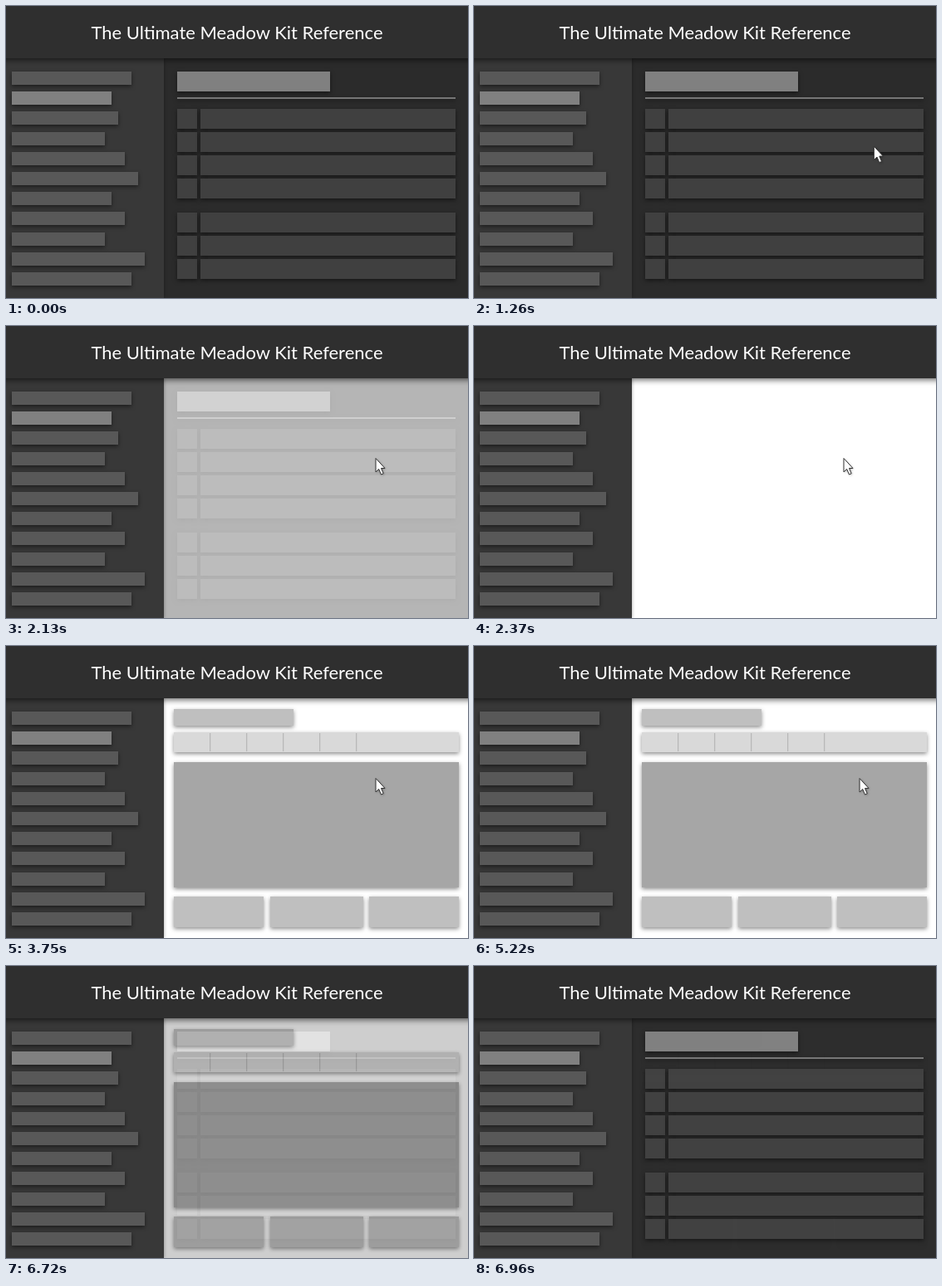
An HTML page with a canvas for the animation above (6.99 s loop, 556 px wide and 352 px high).

```html
<!DOCTYPE html>
<html lang="en">
<head>
<meta charset="utf-8">
<title>Page transition</title>
<style>
  html, body { margin: 0; width: 100%; height: 100%; overflow: hidden; background: #2b2b2b; }
  canvas { position: absolute; left: 0; top: 0; display: block; }
  h1 {
    position: absolute; left: 0; top: 18px; width: 556px; margin: 0;
    font: 400 22px/28px Lato, "Open Sans", sans-serif;
    color: #fff; text-align: center; white-space: nowrap;
  }
</style>
</head>
<body>
<canvas id="stage" width="556" height="352"></canvas>
<h1>The Ultimate Meadow Kit Reference</h1>
<script>
const W = 556, H = 352, LOOP = 6990;
const SIDE = 190, TOP = 63;
const ctx = document.getElementById('stage').getContext('2d');

const grey = v => `rgb(${v},${v},${v})`;
const progress = (t, start, length) => Math.min(1, Math.max(0, (t - start) / length));
const sine = u => (1 - Math.cos(Math.PI * u)) / 2;
const cubic = u => u < 0.5 ? 4 * u ** 3 : 1 - 4 * (1 - u) ** 3;

function layer(paint) {
  const c = document.createElement('canvas');
  c.width = W;
  c.height = H;
  paint(c.getContext('2d'));
  return c;
}

function setShadow(g, alpha, blur, dy) {
  g.shadowColor = `rgba(0,0,0,${alpha})`;
  g.shadowBlur = blur;
  g.shadowOffsetY = dy;
}

// Box given by its edges
function box(g, x1, y1, x2, y2, shade) {
  g.fillStyle = grey(shade);
  g.fillRect(x1, y1, x2 - x1, y2 - y1);
}

const darkPage = layer(g => {
  box(g, SIDE, TOP, W, H, 43);
  setShadow(g, 0.5, 5, 2);
  box(g, 206, 79, 390, 103, 128);
  box(g, 206, 110, 541, 112, 118);
  for (let i = 0; i < 7; i++) {
    const y = Math.round((i < 4 ? 123.5 : 136) + i * 28.2);
    box(g, 206, y, 230, y + 24, 64);
    box(g, 234, y, 541, y + 24, 64);
  }
});

const lightPage = layer(g => {
  setShadow(g, 0.45, 5, 2);
  box(g, 202, 76, 346, 96, 191);
  box(g, 202, 104, 545, 128, 217);
  box(g, 202, 140, 545, 291, 166);
  for (const [x1, x2] of [[202, 310], [318, 430], [437, 545]]) {
    box(g, x1, 302, x2, 339, 191);
  }
  setShadow(g, 0, 0, 0);
  for (let i = 0; i < 5; i++) {
    const x = 245 + i * 44;
    box(g, x, 105, x + 1, 127, 184);
    box(g, x + 1, 105, x + 2, 127, 208);
  }
});

const frame = layer(g => {
  setShadow(g, 0.35, 4, 0);
  box(g, 0, TOP, SIDE, H, 56);
  setShadow(g, 0.5, 5, 2);
  [151, 127, 135, 119, 143, 159, 127, 143, 119, 167, 151].forEach((right, i) => {
    const y = Math.round(79 + i * 24.2);
    box(g, 7, y, right, y + 16, i === 1 ? 128 : 88);
  });
  setShadow(g, 0.6, 7, 2);
  box(g, -10, -10, W + 10, TOP, 47);
});

const arrow = new Path2D('M0 0V16.5L3.7 13L6.4 19.5L9.2 18.3L6.5 12H11Z');

function drawCursor(x, y) {
  ctx.save();
  ctx.translate(x, y);
  setShadow(ctx, 0.35, 3, 1);
  ctx.shadowOffsetX = 1;
  ctx.fillStyle = '#fff';
  ctx.fill(arrow);
  setShadow(ctx, 0, 0, 0);
  ctx.strokeStyle = grey(50);
  ctx.lineWidth = 1;
  ctx.stroke(arrow);
  ctx.restore();
}

function cursorAt(t) {
  if (t < 4650) {
    const away = 1 - cubic(progress(t, 690, 1000));
    return [445 + 115 * away, 159.5 + 54 * away ** 1.5];
  }
  const away = cubic(progress(t, 4650, 1650));
  return [445 + 115 * away, 159.5 + 38 * away ** 3.5];
}

function drawLayer(image, alpha) {
  if (alpha <= 0) return;
  ctx.globalAlpha = alpha;
  ctx.drawImage(image, 0, 0);
  ctx.globalAlpha = 1;
}

function draw(t) {
  ctx.fillStyle = '#fff';
  ctx.fillRect(0, 0, W, H);
  drawLayer(lightPage, sine(progress(t, 3290, 390)));
  const dark = t < 4000
    ? 1 - sine(progress(t, 1885, 410))
    : sine(progress(t, 6598, 392));
  drawLayer(darkPage, dark);
  drawLayer(frame, 1);
  if (t > 690 && t < 6300) drawCursor(...cursorAt(t));
}

const begin = performance.now();
function tick() {
  draw((performance.now() - begin) % LOOP);
  requestAnimationFrame(tick);
}
tick();
</script>
</body>
</html>
```
